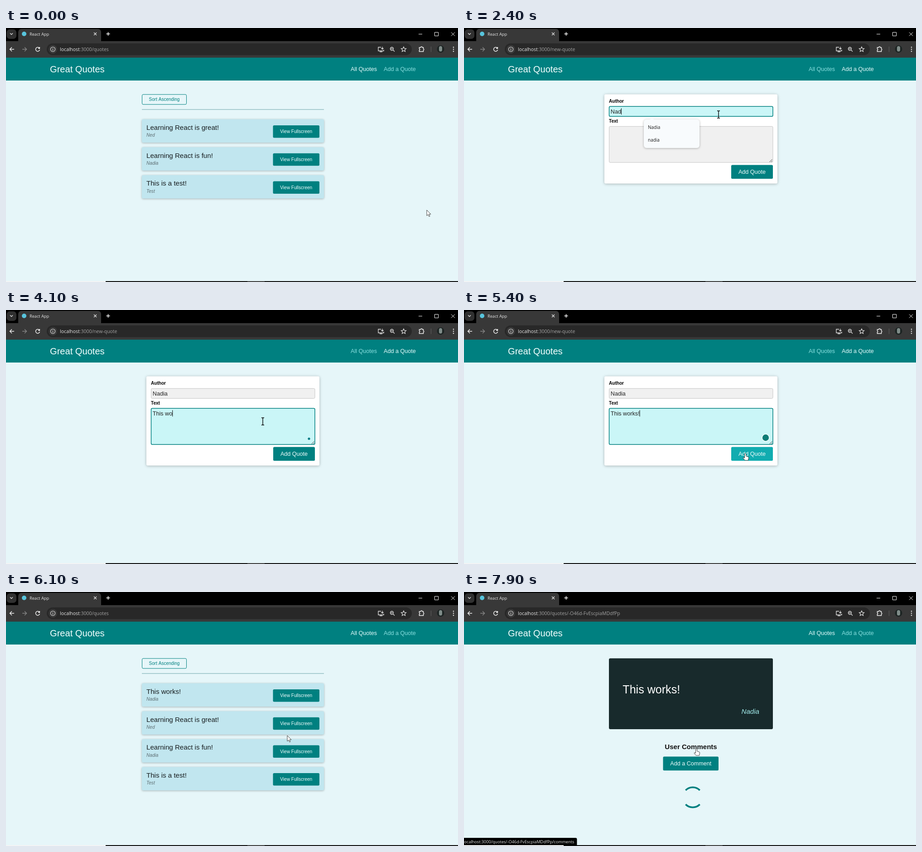
An HTML page with a canvas that plays this animation: 998x561 px, repeating every 8 s.

```html
<!DOCTYPE html>
<html lang="en">
<head>
<meta charset="utf-8">
<title>Great Quotes</title>
<style>
  html, body { margin: 0; width: 100%; height: 100%; overflow: hidden; }
  canvas { display: block; }
</style>
</head>
<body>
<canvas id="stage" width="998" height="561"></canvas>
<script>
const ctx = document.getElementById('stage').getContext('2d');
const LOOP = 8000, STEP = 100;
const TEAL = '#008080', HOVER = '#11acb0', PALE = '#88dfdf', PAGE = '#e6f6f9';
const SANS = '"Liberation Sans", Arial, sans-serif';
const UI = '"Open Sans", "Noto Sans", sans-serif';

const QUOTE_ID = '-O46d-FvEscpiaMDdfPp';
const NEW_QUOTE = 'This works!', AUTHOR = 'Nadia';
const QUOTES = [
  ['Learning React is great!', 'Ned'],
  ['Learning React is fun!', AUTHOR],
  ['This is a test!', 'Test']
];

// When each character is typed
const AUTHOR_KEYS = [2100, 2300, 2400, 2600, 2700];
const QUOTE_KEYS = [3500, 3600, 3700, 3800, 3900, 4000, 4100, 4300, 4500, 4800, 5000];

// Start time, page, path
const PAGES = [
  [0, 'list', '/quotes'],
  [1100, 'form', '/new-quote'],
  [5900, 'loading', '/quotes'],
  [6100, 'list', '/quotes'],
  [6900, 'loading', '/quotes/' + QUOTE_ID],
  [7200, 'detail', '/quotes/' + QUOTE_ID]
];

// Start time, link shown in the status bubble
const STATUS = [
  [0, ''], [1000, '/new-quote'], [1400, ''],
  [6400, '/quotes/' + QUOTE_ID], [7200, ''],
  [7800, '/quotes/' + QUOTE_ID + '/comments']
];

// Time, x, y, pointer shape from then on
const POINTER = [
  [0, 929, 402, 'arrow'], [900, 874, 87, 'hand'], [1300, 874, 87, 'hand'],
  [1400, 840, 97, 'arrow'], [1700, 578, 184, 'beam'], [1800, 562, 191, 'beam'],
  [2700, 562, 191, 'beam'], [3200, 567, 246, 'beam'], [5000, 567, 246, 'beam'],
  [5300, 614, 307, 'hand'], [5400, 621, 317, 'hand'], [5600, 621, 317, 'arrow'],
  [6200, 621, 317, 'arrow'], [6400, 628, 286, 'hand'], [6500, 632, 260, 'arrow'],
  [6600, 637, 230, 'hand'], [6900, 637, 230, 'arrow'], [7400, 637, 230, 'arrow'],
  [7800, 530, 335, 'hand'], [7900, 513, 346, 'hand']
];

const SHAPES = {
  arrow: 'M0 0V12.6L3 9.9L5 14.5L7 13.6L5 9.2H9Z',
  hand: 'M-1.5 1Q0-1.2 1.5 1V5.6L6 7Q8 7.6 7.5 10L6.4 15H-.5L-4.6 10.5Q-5.2 8.2-3 9L-1.5 10Z',
  beam: 'M-3-8H-1L0-7.2L1-8H3M0-7.5V7.5M-3 8H-1L0 7.2L1 8H3'
};

let mouse;

const current = (rows, t) => rows.filter(row => row[0] <= t).pop();
const typed = (string, keys, t) => string.slice(0, keys.filter(k => k <= t).length);

function text(string, x, y, size, color, { style = '', font = SANS, align = 'left' } = {}) {
  ctx.font = `${style} ${size}px ${font}`;
  ctx.fillStyle = color;
  ctx.textAlign = align;
  ctx.fillText(string, x, y);
  return ctx.measureText(string).width;
}

function box(x, y, w, h, r, fill, { line, width = 1, shadow = 0 } = {}) {
  ctx.save();
  ctx.beginPath();
  ctx.roundRect(x, y, w, h, r);
  if (shadow) {
    ctx.shadowColor = 'rgba(0,0,0,.28)';
    ctx.shadowBlur = shadow;
    ctx.shadowOffsetY = 1;
  }
  if (fill) {
    ctx.fillStyle = fill;
    ctx.fill();
  }
  ctx.restore();
  if (line) {
    ctx.strokeStyle = line;
    ctx.lineWidth = width;
    ctx.stroke();
  }
}

function disc(x, y, r, fill) {
  ctx.beginPath();
  ctx.arc(x, y, r, 0, 7);
  ctx.fillStyle = fill;
  ctx.fill();
}

function icon(path, x, y, line = '#e4e4e4', width = 1.3, fill) {
  const shape = new Path2D(path);
  ctx.save();
  ctx.translate(x, y);
  if (fill) {
    ctx.fillStyle = fill;
    ctx.fill(shape);
  }
  ctx.strokeStyle = line;
  ctx.lineWidth = width;
  ctx.stroke(shape);
  ctx.restore();
}

function button(label, x, y, w, h, size) {
  const over = mouse.kind === 'hand' &&
    mouse.x > x && mouse.x < x + w && mouse.y > y && mouse.y < y + h;
  box(x, y, w, h, 2.5, over ? HOVER : TEAL);
  text(label, x + w / 2, y + h / 2 + size * .36, size, '#f2fcfc', { align: 'center' });
}

function spinner(x, y, elapsed) {
  const turn = elapsed / 1200 * 2 * Math.PI;
  ctx.strokeStyle = TEAL;
  ctx.lineWidth = 3.8;
  for (const side of [-.75, .25]) {
    const from = turn + side * Math.PI;
    ctx.beginPath();
    ctx.arc(x, y, 22.1, from, from + Math.PI / 2);
    ctx.stroke();
  }
}

function drawBrowser(path) {
  box(0, 0, 998, 29, 0, '#000');
  box(0, 29, 998, 37, 0, '#383838');
  box(1.5, 3, 21.5, 21, 7, '#303030');
  icon('M-3-1.5L0 1.5L3-1.5', 12, 13);
  box(27, 2, 183, 30, [7, 7, 0, 0], '#383838');
  disc(40, 13, 5, '#58c4dc');
  text('React App', 52, 16.8, 9.2, '#e8e8e8', { font: UI });
  icon('M-3-3L3 3M3-3L-3 3', 197, 13);
  icon('M-4 0H4M0-4V4', 225.5, 13, '#fff', 1.5);
  icon('M-4 0H4', 915, 13.5, '#fff', 1);
  icon('M-4-4H4V4H-4Z', 950.5, 13.5, '#fff', 1);
  icon('M-4-4L4 4M4-4L-4 4', 987, 13.5, '#fff', 1);

  icon('M5 0H-4M0-4.5L-4.5 0L0 4.5', 13, 47, '#eee', 1.5);
  icon('M-5 0H4M0-4.5L4.5 0L0 4.5', 41, 47, '#858585', 1.4);
  icon('M3.6-2.7A4.5 4.5 0 1 0 4.4 1M4.3-5V-1.8H1', 70, 47, '#eee', 1.5);
  box(90, 34, 806, 26, 13, '#282828');
  disc(103.5, 47, 9.5, '#3a3a3a');
  icon('M5 0A5 5 0 1 1-5 0A5 5 0 1 1 5 0M0-.8V3M0-2.8V-1.5', 103.5, 47, '#e4e4e4', 1.1);
  const host = text('localhost', 119, 51, 10.45, '#e8e8e8', { font: UI });
  text(':3000' + path, 119 + host, 51, 10.45, '#a3a3a3', { font: UI });

  icon('M0-4.5H-6V3.5H6V1M-3 5.5H3M3-5.5V0M.5-2.5L3 0L5.5-2.5', 828, 47);
  icon('M2.5-1A3.5 3.5 0 1 1-4.5-1A3.5 3.5 0 1 1 2.5-1M1.5 1.5L5 5M-3-1H1', 853, 47);
  icon('M0-5.5L1.6-1.8L5.5-1.5L2.5 1.1L3.5 5L0 2.9L-3.5 5L-2.5 1.1L-5.5-1.5L-1.6-1.8Z', 878, 47, '#e4e4e4', 1.2);
  icon('M-5-3.5H-1.8A1.8 1.8 0 0 1 1.8-3.5H4V-.8A1.8 1.8 0 0 1 4 2.6V5.5H-5V2.6A1.8 1.8 0 0 0-5-.8Z', 917.5, 46.5, '#f0f0f0', 1.5);
  box(938, 41, 1, 12, 0, '#606060');
  disc(959.5, 46.5, 8, '#1c2423');
  box(956, 40, 7, 12, 3.5, '#7f8c89');
  for (const y of [42.5, 47, 51.5]) disc(988, y, 1.2, '#eee');
}

function drawHeader(page, t) {
  box(0, 65.5, 998, 50.5, 0, TEAL);
  text('Great Quotes', 97, 97.8, 20.1, '#f4ffff');
  const adding = page === 'form', hovering = t >= 900 && t < 1400;
  text('All Quotes', 761, 95.2, 12.6, adding ? PALE : '#e6fcfc');
  text('Add a Quote', 834, 95.2, 12.6, adding || hovering ? '#e6fcfc' : PALE);
}

function drawList(quotes) {
  box(300.5, 146.8, 98, 22, 2.5, null, { line: TEAL });
  text('Sort Ascending', 349.5, 161, 10, TEAL, { align: 'center' });
  box(300, 179.3, 402, 1.4, 0, '#93bfc5');
  quotes.forEach(([quote, author], i) => {
    const y = 201.5 + i * 61.7;
    box(300, y, 402, 51.5, 3, '#c1e6ef', { shadow: 4 });
    text(quote, 310, y + 23.5, 15.1, '#161c1e');
    text(author, 310, y + 38.7, 10.1, '#5d6d72', { style: 'italic' });
    button('View Fullscreen', 589.5, y + 13.5, 102.5, 27.5, 10.08);
  });
}

function field(y, h, value, focused) {
  box(320.5, y, 361.5, h, 2.5, focused ? '#caf6f7' : '#f0f0f0',
    { line: focused ? TEAL : '#c5c5c5', width: focused ? 1.5 : 1 });
  const width = text(value, 323.8, y + 15.2, 12.6, '#222');
  if (focused) box(323.8 + width, y + 4, 1, 14, 0, '#000');
}

function drawForm(t) {
  const inAuthor = t >= 2000 && t < 3300, inText = t >= 3300;
  box(310, 146.5, 382, 197, 3, '#fff', { shadow: 6 });
  text('Author', 320, 165, 10.07, '#000', { style: 'bold' });
  field(173.3, 22, typed(AUTHOR, AUTHOR_KEYS, t), inAuthor);
  text('Text', 320, 209.2, 10.07, '#000', { style: 'bold' });
  field(217.3, 79.7, typed(NEW_QUOTE, QUOTE_KEYS, t), inText);
  icon('M0 6L6 0M3.5 6L6 3.5', 674.5, 290, '#444', 1);
  button('Add Quote', 590, 302.5, 92, 30.5, 12.6);

  if (t >= 5100) {
    disc(666, 282, 8.5, '#fff');
    disc(666, 282, 7.2, '#0c7c76');
  } else if (t >= 3400) {
    disc(669, 284.3, 2.6, '#0c7c86');
  }
  if (t >= 2100 && t < 3000) {
    box(397, 202, 123, 63, 6, '#f8fbfd', { shadow: 5 });
    icon('M-5 3L0-2L5 3Z', 415, 200, '#f8fbfd', .5, '#f8fbfd');
    text(AUTHOR, 406, 223, 10, '#1c1c1c', { font: UI });
    text(AUTHOR.toLowerCase(), 406, 251.3, 10, '#1c1c1c', { font: UI });
  }
  if (t >= 5600) {
    box(310, 146.5, 382, 197, 3, 'rgba(255,255,255,.7)');
    spinner(505, 249, t - 5600);
  }
}

function drawDetail(t) {
  box(320, 146.5, 362, 156.5, 3, '#182a2c');
  text(NEW_QUOTE, 350.3, 224, 25.1, '#fff');
  text(AUTHOR, 652, 269, 15.1, '#a4eeee', { style: 'italic', align: 'right' });
  text('User Comments', 501, 347, 15.06, '#111', { style: 'bold', align: 'center' });
  button('Add a Comment', 439.5, 363.5, 122.5, 30.7, 12.6);
  spinner(505, 453.5, t - 7300);
}

function drawStatus(path) {
  box(0, 559, 998, 2, 0, '#0c0c0c');
  box(0, 559, 220, 2, 0, '#f4f4f4');
  box(533, 559, 38, 2, 0, '#3c3c3c');
  if (!path) return;
  const link = 'localhost:3000' + path;
  ctx.font = `9.12px ${UI}`;
  box(0, 543, ctx.measureText(link).width + 4, 16, [0, 3, 0, 0], '#000');
  text(link, -2, 554.5, 9.12, '#e6e6e6', { font: UI });
}

function pointerAt(t) {
  const i = POINTER.findLastIndex(p => p[0] <= t);
  const [t0, x0, y0, kind] = POINTER[i];
  const [t1, x1, y1] = POINTER[i + 1] || [LOOP, x0, y0];
  const k = (t - t0) / (t1 - t0);
  return { x: x0 + (x1 - x0) * k, y: y0 + (y1 - y0) * k, kind };
}

function draw(t) {
  const [start, page, path] = current(PAGES, t);
  mouse = pointerAt(t);
  box(0, 0, 998, 561, 0, PAGE);
  drawBrowser(path);
  drawHeader(page, t);
  if (page === 'list') drawList(start ? [[NEW_QUOTE, AUTHOR], ...QUOTES] : QUOTES);
  if (page === 'form') drawForm(t);
  if (page === 'loading') spinner(505, 175.5, t - start + 50);
  if (page === 'detail') drawDetail(t);
  drawStatus(current(STATUS, t)[1]);
  const beam = mouse.kind === 'beam';
  icon(SHAPES[mouse.kind], mouse.x, mouse.y, beam ? '#000' : '#333', beam ? 1.4 : .9, beam ? null : '#fff');
}

function tick() {
  draw(Math.floor(performance.now() % LOOP / STEP) * STEP);
  requestAnimationFrame(tick);
}
tick();
</script>
</body>
</html>
```
